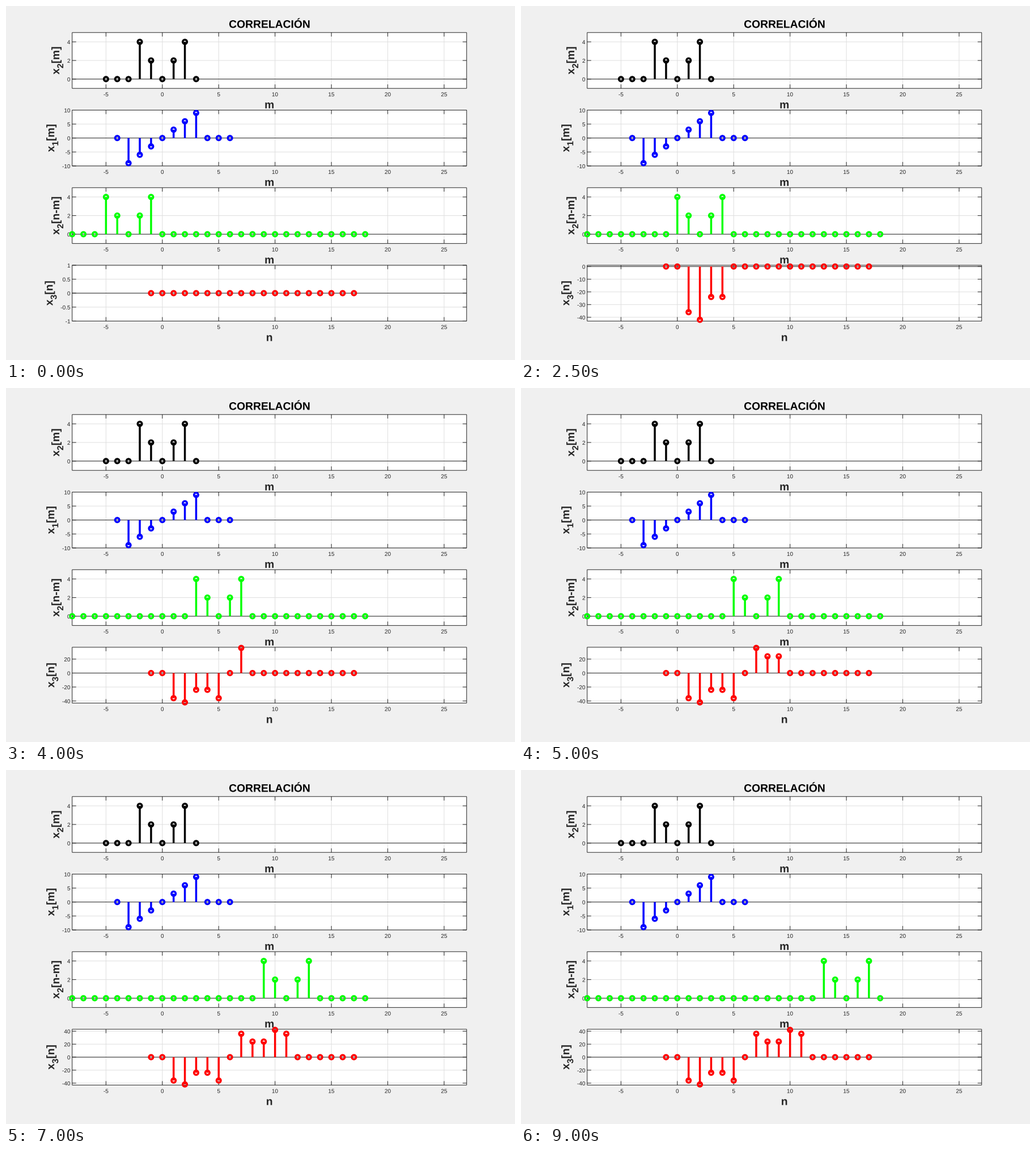
A matplotlib script for the animation above (9500 ms loop, 898 px wide and 624 px high).

```python
import matplotlib.pyplot as plt
import numpy as np
from matplotlib.animation import FuncAnimation
from matplotlib.collections import LineCollection, PatchCollection
from matplotlib.patches import Circle, PathPatch, Rectangle
from matplotlib.textpath import TextPath
from matplotlib.transforms import Affine2D

W, H = 898, 624
LEFT, RIGHT = 0.13 * W, 0.905 * W
MIDDLE = (LEFT + RIGHT) / 2
HEIGHT, PITCH = 0.1577 * H, 0.2191 * H
X_MIN, X_MAX = -8, 27
TICK = 7
SMALL, BIG = 10, 19.3
DARK, GRID = "#262626", "#dfdfdf"
X_TICKS = range(-5, 26, 5)
EM = {"-": 0.333, ".": 0.278, "[": 0.333, "]": 0.333, "m": 0.889, "n": 0.611}

fig = plt.figure(figsize=(W / 72, H / 72), dpi=72, facecolor="#f0f0f0")
ax = fig.add_axes([0, 0, 1, 1])
ax.set(xlim=(0, W), ylim=(H, 0))
ax.axis("off")


def em_width(s):
    return sum(EM.get(c, 0.556) for c in s)


def px(x):
    return LEFT + (x - X_MIN) / (X_MAX - X_MIN) * (RIGHT - LEFT)


def text(x, y, s, size=BIG, ha="center", color=DARK, rot=0):
    """Outlined text with its baseline starting, centred or ending at x, y."""
    font = {"family": "Liberation Sans", "weight": "bold" if size > SMALL else "normal"}
    path = TextPath((0, 0), s, size=size, prop=font)
    box = path.get_extents()
    shift = {"left": 0, "center": (box.x0 + box.x1) / 2, "right": box.x1}[ha]
    place = Affine2D().translate(-shift, 0).scale(1, -1).rotate_deg(-rot).translate(x, y)
    return ax.add_patch(PathPatch(place.transform_path(path), fc=color, ec="none",
                                  lw=0, snap=False, zorder=3))


def lines(segments, color, width=1, z=2):
    group = LineCollection(segments, colors=color, linewidths=width, zorder=z,
                           snap=False, capstyle="butt")
    return ax.add_collection(group, autolim=False)


def y_label(x, y, sub, arg):
    """Rotated label: x, a subscript and a bracketed argument."""
    small = 0.8 * BIG
    parts = [("x", BIG, 0), (sub, small, 7), (arg, BIG, 0)]
    y += sum(em_width(s) * size for s, size, _ in parts) / 2
    out = []
    for s, size, drop in parts:
        out.append(text(x + drop, y, s, size, "left", rot=90))
        y -= em_width(s) * size
    return out


def panel(row, xs, ys, color, lim, step, sub, arg, x_label):
    """Draw one stem plot and return its artists."""
    bottom = 0.89 * H - (3 - row) * PITCH
    top = bottom - HEIGHT
    lo, hi = lim

    def py(y):
        return bottom - (y - lo) / (hi - lo) * HEIGHT

    y_ticks = np.arange(np.ceil(lo / step), np.floor(hi / step) + 1) * step + 0.0
    names = [f"{v:g}" for v in y_ticks]
    tx = [px(v) for v in X_TICKS]
    ty = [py(v) for v in y_ticks]

    face = Rectangle((LEFT, top), RIGHT - LEFT, HEIGHT, fc="white", ec="none",
                     snap=False, zorder=0)
    out = [ax.add_patch(face)]

    grid = [[(x, top), (x, bottom)] for x in tx]
    grid += [[(LEFT, y), (RIGHT, y)] for y in ty]
    out.append(lines(grid, GRID, z=1))

    frame = [[(LEFT, y), (RIGHT, y)] for y in (top, bottom, py(0))]
    frame += [[(x, top), (x, bottom)] for x in (LEFT, RIGHT)]
    for x in tx:
        frame += [[(x, top), (x, top + TICK)], [(x, bottom), (x, bottom - TICK)]]
    for y in ty:
        frame += [[(LEFT, y), (LEFT + TICK, y)], [(RIGHT, y), (RIGHT - TICK, y)]]
    out.append(lines(frame, DARK))

    out += [text(x, bottom + 14, str(v), SMALL) for x, v in zip(tx, X_TICKS)]
    out += [text(113.1, y + 4, s, SMALL, "right") for y, s in zip(ty, names)]
    out.append(text(MIDDLE, bottom + 35.2, x_label))
    label_x = 99.6 - SMALL * max(map(em_width, names))
    out += y_label(label_x, (top + bottom) / 2, sub, arg)

    stems = [[(px(x), py(0)), (px(x), py(y))] for x, y in zip(xs, ys) if y]
    out.append(lines(stems, color, 3.5, 4))
    rings = PatchCollection([Circle((px(x), py(y)), 3.75) for x, y in zip(xs, ys)],
                            facecolors="none", edgecolors=color, linewidths=3.5, zorder=5)
    out.append(ax.add_collection(rings, autolim=False))
    return out


def pulse(n):
    """Second signal: 4 2 0 2 4 around zero."""
    return np.where(np.abs(n) <= 2, 2 * np.abs(n), 0)


def ramp(n):
    """First signal: slope 3 between -3 and 3."""
    return np.where(np.abs(n) <= 3, 3 * n, 0)


x2_axis = np.arange(-5, 4)
x1_axis = np.arange(-4, 7)
shift_axis = np.arange(-8, 19)
x3_axis = np.arange(-1, 18)
x3 = np.array([np.sum(ramp(x1_axis) * pulse(n - 6 - x1_axis)) for n in x3_axis])

text(MIDDLE, 38.5, "CORRELACIÓN", color="black")
panel(0, x2_axis, pulse(x2_axis), "black", (-1, 5), 2, "2", "[m]", "m")
panel(1, x1_axis, ramp(x1_axis), "#0000ff", (-10, 10), 5, "1", "[m]", "m")

moving = []


def update(k):
    while moving:
        moving.pop().remove()
    moving.extend(panel(2, shift_axis, pulse(shift_axis - (k - 3)), "#00ff00",
                        (-1, 5), 2, "2", "[n-m]", "m"))
    known = np.where(np.arange(len(x3)) <= k, x3, 0)
    lo, hi = known.min() - 1, known.max() + 1
    step = 0.5 if hi - lo <= 2 else 10 if hi - lo < 60 else 20
    moving.extend(panel(3, x3_axis, known, "#ff0000", (lo, hi), step, "3", "[n]", "n"))
    return moving


anim = FuncAnimation(fig, update, frames=len(x3), init_func=lambda: [],
                     interval=500, repeat=True, repeat_delay=0)
plt.show()
```
